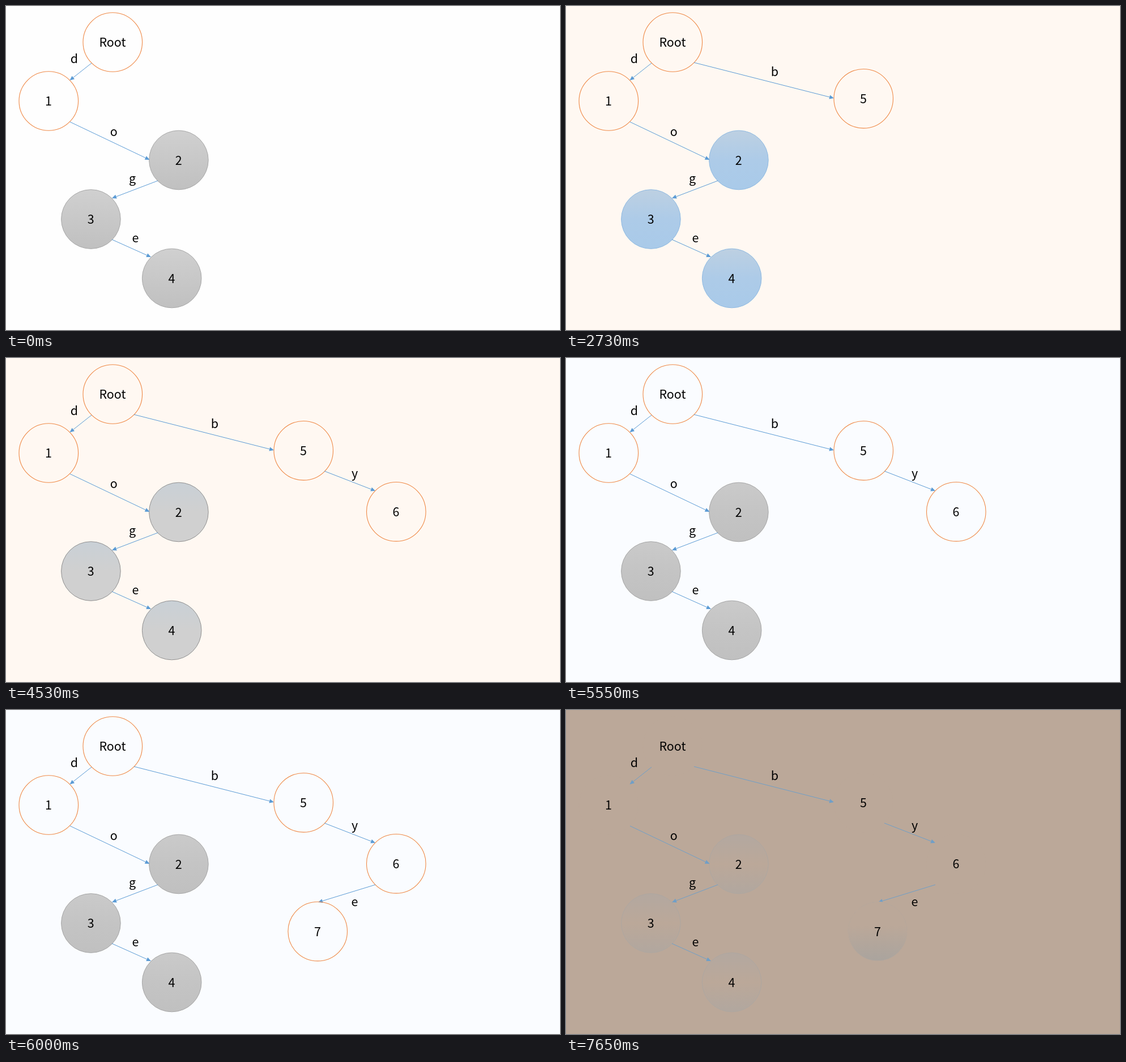
Recreate the animation shown at these times as an HTML page. Size 978 px wide and 573 px high, loop 9150 ms.

```html
<!DOCTYPE html>
<html lang="en">
<head>
<meta charset="utf-8">
<title>Trie insertion</title>
<style>
  html, body { margin: 0; width: 100%; height: 100%; overflow: hidden; }
  body { background: var(--bg); }
  svg { display: block; width: 978px; height: 573px; }
  text {
    font: 300 21.5px "Noto Sans CJK SC", "Noto Sans CJK JP", "Noto Sans", sans-serif;
    text-anchor: middle;
    fill: #000;
  }
  .ring { fill: none; stroke: var(--ring); stroke-width: 1.1; }
  .word { fill: url(#shade); stroke: var(--edge); }
  .last { fill: url(#lastShade); stroke: var(--edge); }
  .arrow line { stroke: var(--line); stroke-width: 1; }
  .arrow path { fill: var(--line); }
  .top { stop-color: var(--top); }
  .mid { stop-color: var(--mid); }
  .low { stop-color: var(--low); }
  .lastTop { stop-color: var(--lastTop); }
  .lastLow { stop-color: var(--lastLow); }
</style>
</head>
<body>
<svg viewBox="0 0 978 573">
  <defs>
    <linearGradient id="shade" x2="0" y2="1">
      <stop class="top" offset="0"/>
      <stop class="mid" offset=".5"/>
      <stop class="low" offset="1"/>
    </linearGradient>
    <linearGradient id="lastShade" x2="0" y2="1">
      <stop class="lastTop" offset="0"/>
      <stop class="lastTop" offset=".4"/>
      <stop class="lastLow" offset="1"/>
    </linearGradient>
    <clipPath id="rise"><rect id="riseBox" x="490" width="120"/></clipPath>
  </defs>
</svg>
<script>
const LOOP = 9150, STEP = 30, R = 52.3;
const svg = document.querySelector('svg');
const defs = document.querySelector('defs');

function add(parent, tag, attrs, text) {
  const el = document.createElementNS('http://www.w3.org/2000/svg', tag);
  for (const key in attrs) el.setAttribute(key, attrs[key]);
  if (text) el.textContent = text;
  parent.append(el);
  return el;
}

function node(parent, x, y, name, kind = 'ring') {
  add(parent, 'circle', { cx: x, cy: y, r: R, class: kind });
  add(parent, 'text', { x: x - 0.3, y: y + 8 }, name);
}

function edge(parent, x1, y1, x2, y2, letter, lx, ly) {
  const g = add(parent, 'g', { class: 'arrow' });
  const len = Math.hypot(x2 - x1, y2 - y1);
  const ux = (x2 - x1) / len, uy = (y2 - y1) / len;
  const bx = x2 - ux * 8, by = y2 - uy * 8;
  add(g, 'line', { x1, y1, x2: bx, y2: by });
  add(g, 'path', {
    d: `M${x2} ${y2}L${bx - uy * 3.6} ${by + ux * 3.6}L${bx + uy * 3.6} ${by - ux * 3.6}z`
  });
  add(parent, 'text', { x: lx, y: ly }, letter);
}

function seeded(seed) {
  return () => (seed = (seed * 16807) % 2147483647) / 2147483647;
}

// A group that appears through random horizontal bars.
function barGroup(id, start, end, top, bottom, seed) {
  const clip = add(defs, 'clipPath', { id });
  const path = add(clip, 'path', { d: '' });
  const g = add(svg, 'g', { 'clip-path': `url(#${id})` });
  const rand = seeded(seed), rows = [];
  for (let y = top; y < bottom; y += 2) rows.push({ y, at: rand() });
  const show = t => {
    const p = (t - start) / (end - start);
    path.setAttribute('d', p >= 1
      ? `M0 ${top}H978V${bottom}H0z`
      : rows.filter(r => r.at < p).map(r => `M0 ${r.y}H978v2H0z`).join(''));
  };
  return { g, show };
}

node(svg, 188.3, 64, 'Root');
node(svg, 75.3, 168, '1');
node(svg, 304.9, 272.5, '2', 'word');
node(svg, 149.9, 377, '3', 'word');
node(svg, 292.7, 481.5, '4', 'word');
edge(svg, 151, 101, 112.5, 131.5, 'd', 120.5, 101);
edge(svg, 113, 205, 253.5, 272, 'o', 190.3, 230);
edge(svg, 268, 309, 187, 340, 'g', 223, 313);
edge(svg, 187, 413, 256, 444, 'e', 228.5, 417.5);

const b = barGroup('barsB', 2250, 2730, 94, 222, 4177);
edge(b.g, 226, 100, 473, 163, 'b', 368.5, 124);
node(b.g, 525.2, 163.8, '5');

const y = barGroup('barsY', 4140, 4530, 190, 330, 90731);
edge(y.g, 562, 200, 652, 235, 'y', 615.6, 212);
node(y.g, 688.8, 271.8, '6');

const e = barGroup('barsE', 5550, 6000, 304, 450, 26893);
edge(e.g, 652, 309, 551, 340, 'e', 615.5, 347);
add(e.g, 'circle', { cx: 550.2, cy: 391.6, r: R, class: 'last', 'clip-path': 'url(#rise)' });
node(e.g, 550.2, 391.6, '7');

const keys = ['bg', 'ring', 'line', 'edge', 'top', 'mid', 'low', 'lastTop', 'lastLow'];
const palettes = [
  [0, '#fefefe #ef8a48 #5b9bd5 #a8a8a8 #d0d0d0 #c8c8c8 #c0c0c0 #d0d0d0 #c0c0c0'],
  [2250, '#fffcf8 #fff8f2 #fff8f2 #fff8f2 #fff8f2 #fff8f2 #fff8f2 #fff8f2 #fff8f2'],
  [2280, '#fff8f2 #ef8a48 #5b9bd5 #8fbae2 #bdd0e2 #adcbe8 #a9cae9 #bdd0e2 #a9cae9'],
  [4140, '#fff8f2 #ef8a48 #5b9bd5 #909090 #c9d0d6 #d0d0d0 #d0d0d0 #d0d0d0 #d0d0d0'],
  [5550, '#fafcff #ef8a48 #5b9bd5 #a6a6a6 #cacaca #c4c4c4 #c0c0c0 #cacaca #c0c0c0'],
  [7140, '#fafafa #ef8a48 #d5c0b3 #d8b9a5 #dfd7d0 #ddcfc4 #dbc4b4 #d8d8dc #cdcdd4'],
  [7650, '#bba899 #bba899 #6f9fc8 #aea7a1 #b3a8a0 #bba899 #b1a79f #bba899 #aaa49e']
].map(([at, list]) => ({ at, colors: list.split(' ') }));

const riseBox = document.getElementById('riseBox');
let current;

function draw(t) {
  const pal = palettes.filter(p => p.at <= t).pop();
  if (pal !== current) {
    current = pal;
    keys.forEach((k, i) => document.body.style.setProperty('--' + k, pal.colors[i]));
  }
  [b, y, e].forEach(group => group.show(t));
  const rise = Math.min(1, Math.max(0, (t - 7140) / 510)) * 106;
  riseBox.setAttribute('y', 444.6 - rise);
  riseBox.setAttribute('height', rise);
}

const began = performance.now();
function tick() {
  const t = (performance.now() - began) % LOOP;
  draw(Math.floor(t / STEP) * STEP);
  requestAnimationFrame(tick);
}
draw(0);
requestAnimationFrame(tick);
</script>
</body>
</html>
```
